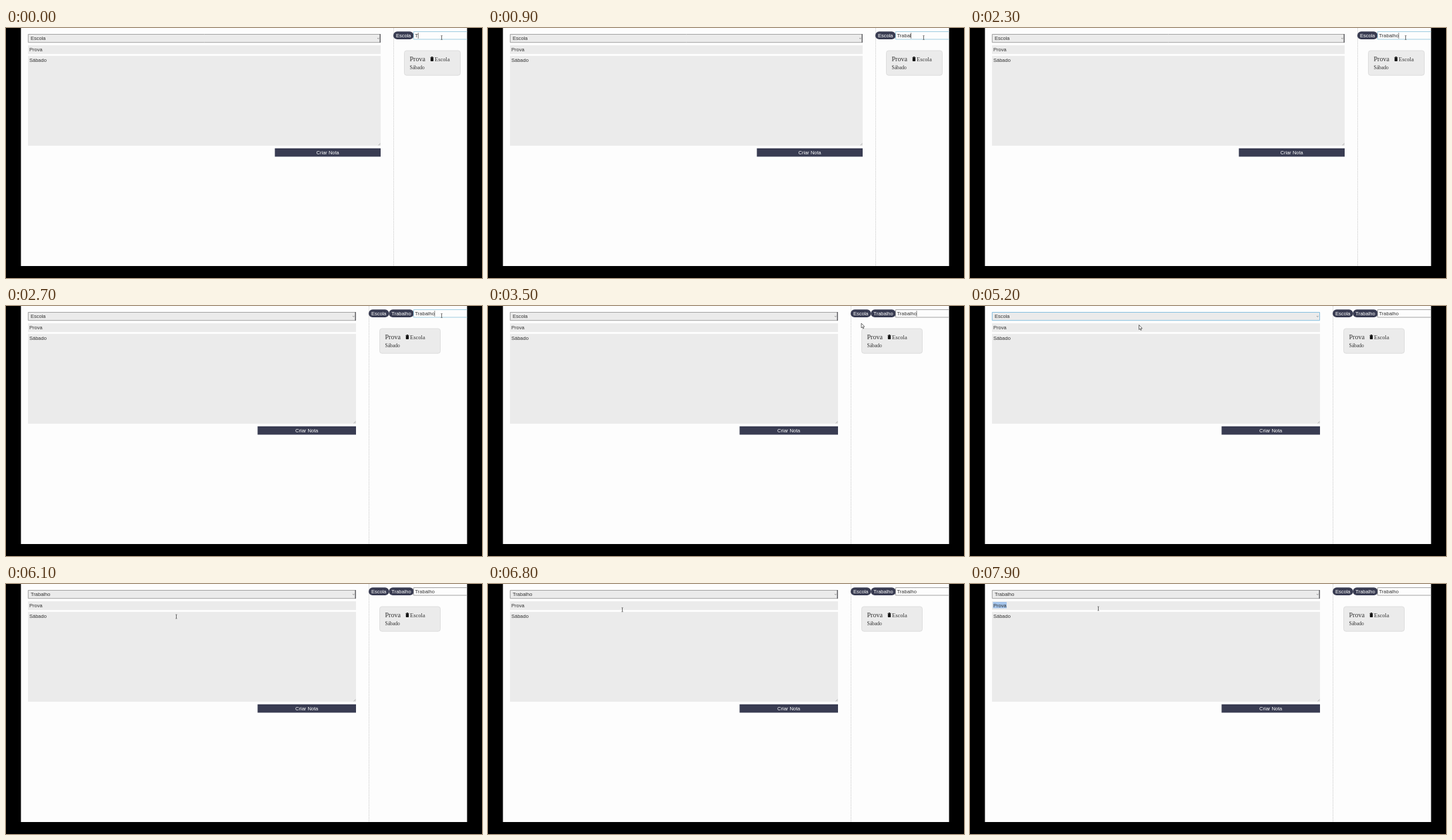
An HTML page with a canvas that plays this animation: 714x376 px, repeating every 8000 ms.

```html
<!DOCTYPE html>
<html lang="pt">
<head>
<meta charset="utf-8">
<title>Notas</title>
<style>
  html, body { margin: 0; width: 100%; height: 100%; overflow: hidden; background: #000; }
  canvas { display: block; }
</style>
</head>
<body>
<canvas id="stage" width="714" height="376"></canvas>
<script>
const ctx = document.getElementById('stage').getContext('2d');
const LOOP = 8000, STEP = 100;
const SANS = '7.5px "Liberation Sans", Arial, sans-serif';
const serif = size => `${size}px "Liberation Serif", "Times New Roman", serif`;
const FIELD = '#ebebeb', NAVY = '#393c52', INK = '#333', BLUE = '#86bfdf', CARET = '#4a4a4a';

// Moments at which another letter of the tag has been typed
const KEY_TIMES = [0, 200, 300, 500, 600, 900, 1100, 1300];
// Times at which the caret in the tag input toggles, starting visible
const TAG_BLINKS = [1800, 2300, 2900, 3400, 3900, 4300, 4700];
const ENTER = 2700, LEAVE_INPUT = 3500, OPEN = 4300, CHOOSE = 6000;
const CLICK_TITLE = 6900, TITLE_BLINK = 7500, SELECT_TITLE = 7900;

// Pointer path: time, x, y
const PATH = [
  [3300, 653.5, 14.5], [3500, 560, 26], [3800, 310, 43], [4100, 265.5, 32],
  [4200, 265, 29], [4500, 264, 12], [4900, 264, 12], [5200, 253.5, 28.5],
  [5800, 254, 44], [5900, 254, 44], [6000, 255.5, 49], [6200, 255.5, 49],
  [6900, 192.5, 37]
];

function pointerAt(t) {
  const next = PATH.findIndex(p => p[0] > t);
  if (next === 0) return PATH[0].slice(1);
  if (next < 0) return PATH[PATH.length - 1].slice(1);
  const [t0, x0, y0] = PATH[next - 1], [t1, x1, y1] = PATH[next];
  const k = (t - t0) / (t1 - t0);
  return [x0 + (x1 - x0) * k, y0 + (y1 - y0) * k];
}

function rect(x, y, w, h, fill) {
  ctx.fillStyle = fill;
  ctx.fillRect(x, y, w, h);
}

function roundRect(x, y, w, h, r, fill, stroke) {
  ctx.beginPath();
  ctx.roundRect(x, y, w, h, r);
  ctx.fillStyle = fill;
  ctx.fill();
  if (stroke) outline(stroke);
}

function outline(color, width = 1) {
  ctx.strokeStyle = color;
  ctx.lineWidth = width;
  ctx.stroke();
}

function line(points, color, width = 1) {
  ctx.beginPath();
  points.forEach(([x, y]) => ctx.lineTo(x, y));
  outline(color, width);
}

function text(str, x, y, color = INK, font = SANS, align = 'left') {
  ctx.font = font;
  ctx.textAlign = align;
  ctx.fillStyle = color;
  ctx.fillText(str, x, y);
}

function textWidth(str) {
  ctx.font = SANS;
  return ctx.measureText(str).width;
}

function drawSelect(right, value, active) {
  rect(33, 9, right - 33, 13, FIELD);
  ctx.beginPath();
  ctx.rect(33.3, 9.5, right - 33.8, 12.2);
  outline(active ? BLUE : '#a2a2a2');
  if (!active) line([[right - 0.8, 9], [right - 0.8, 22]], '#66666a', 1.5);
  line([[right - 5, 15], [right - 3.6, 16.2], [right - 2.2, 15]], '#777', 0.8);
  text(value, 37, 18);
}

function drawTitle(right, t) {
  rect(33, 26, right - 33, 13, FIELD);
  if (t >= SELECT_TITLE) rect(34.5, 27, 20.5, 9.5, '#a3c3ea');
  text('Prova', 35, 34.7);
  if (t >= CLICK_TITLE && t < TITLE_BLINK) rect(54, 27, 0.8, 9, CARET);
}

function drawForm(right, t) {
  drawSelect(right, t >= CHOOSE ? 'Trabalho' : 'Escola', t >= OPEN && t < CHOOSE);
  drawTitle(right, t);

  rect(33, 42, right - 33, 135, FIELD);
  text('Sábado', 35, 51);
  line([[right - 3.5, 176.5], [right - 0.5, 173.5]], '#999', 0.7);
  line([[right - 1.5, 176.5], [right - 0.5, 175.5]], '#999', 0.7);

  const width = (right - 33) * 0.3;
  rect(right - width, 181, width, 12.5, NAVY);
  text('Criar Nota', right - width / 2, 189.5, '#fff', SANS, 'center');
}

function drawTag(label, x, w) {
  roundRect(x, 5.3, w, 11.8, 5.9, NAVY);
  text(label, x + w / 2, 13.8, '#fff', SANS, 'center');
}

function drawTagInput(t) {
  const typed = 'Trabalho'.slice(0, KEY_TIMES.filter(k => k <= t).length);
  ctx.beginPath();
  ctx.rect(611.5, 5.5, 84, 11.5);
  outline(t < LEAVE_INPUT ? '#9fcde0' : '#a2a2a2');
  text(typed, 613.5, 14);
  const caretOn = TAG_BLINKS.filter(b => b <= t).length % 2 === 0;
  if (caretOn) rect(613.3 + textWidth(typed), 7.2, 0.7, 8.6, CARET);
}

function drawBin(x) {
  rect(x, 43.8, 5, 1, '#111');
  rect(x + 1.5, 43, 2, 1, '#111');
  roundRect(x + 0.3, 45, 4.4, 5, 0.7, '#111');
}

function drawCard(left, right) {
  roundRect(left + 0.5, 34, right - left - 1, 37.2, 3.5, FIELD, '#dedede');
  text('Prova', left + 8.5, 50.4, INK, serif(10.1));
  drawBin(left + 39.5);
  text('Escola', left + 46, 49.8, INK, serif(8.5));
  text('Sábado', left + 8.5, 62, INK, serif(7.6));
}

function drawSidebar(left, entered, t) {
  ctx.setLineDash([1.5, 1]);
  line([[left + 0.5, 0], [left + 0.5, 358]], '#c6c6c6', 0.8);
  ctx.setLineDash([]);

  drawTag('Escola', left, 30.5);
  if (entered) drawTag('Trabalho', 574.3, 37.4);
  drawTagInput(t);
  if (entered) drawCard(560, 652);
  else drawCard(597, 682);
}

function drawBeam(x, y) {
  line([[x, y - 3], [x, y + 3]], '#444', 0.8);
  for (const end of [-3, 3]) line([[x - 1.4, y + end], [x + 1.4, y + end]], '#666', 0.6);
}

function drawArrow(x, y) {
  const shape = [[0, 0], [0, 7], [1.6, 5.6], [2.6, 8], [3.7, 7.5], [2.7, 5.2], [4.8, 5.1]];
  ctx.beginPath();
  shape.forEach(([dx, dy]) => ctx.lineTo(x + dx, y + dy));
  ctx.closePath();
  ctx.fillStyle = '#fff';
  ctx.fill();
  outline('#444', 0.8);
}

function drawPointer(t) {
  const [x, y] = pointerAt(t);
  const overSidebar = x > 525 && x < 612;
  const overList = t >= OPEN && t < CHOOSE;
  if (overSidebar || overList) drawArrow(x, y);
  else drawBeam(x, y);
}

function draw(now) {
  const t = Math.floor((now % LOOP) / STEP) * STEP;
  const entered = t >= ENTER;
  rect(0, 0, 714, 376, '#000');
  ctx.save();
  ctx.beginPath();
  ctx.rect(22.4, 0, 669.2, 358);
  ctx.clip();
  rect(22, 0, 670, 358, '#fdfdfd');
  drawForm(entered ? 525 : 562, t);
  drawSidebar(entered ? 544 : 581, entered, t);
  drawPointer(t);
  ctx.restore();
}

const start = performance.now();
function tick() {
  draw(performance.now() - start);
  requestAnimationFrame(tick);
}
tick();
</script>
</body>
</html>
```
